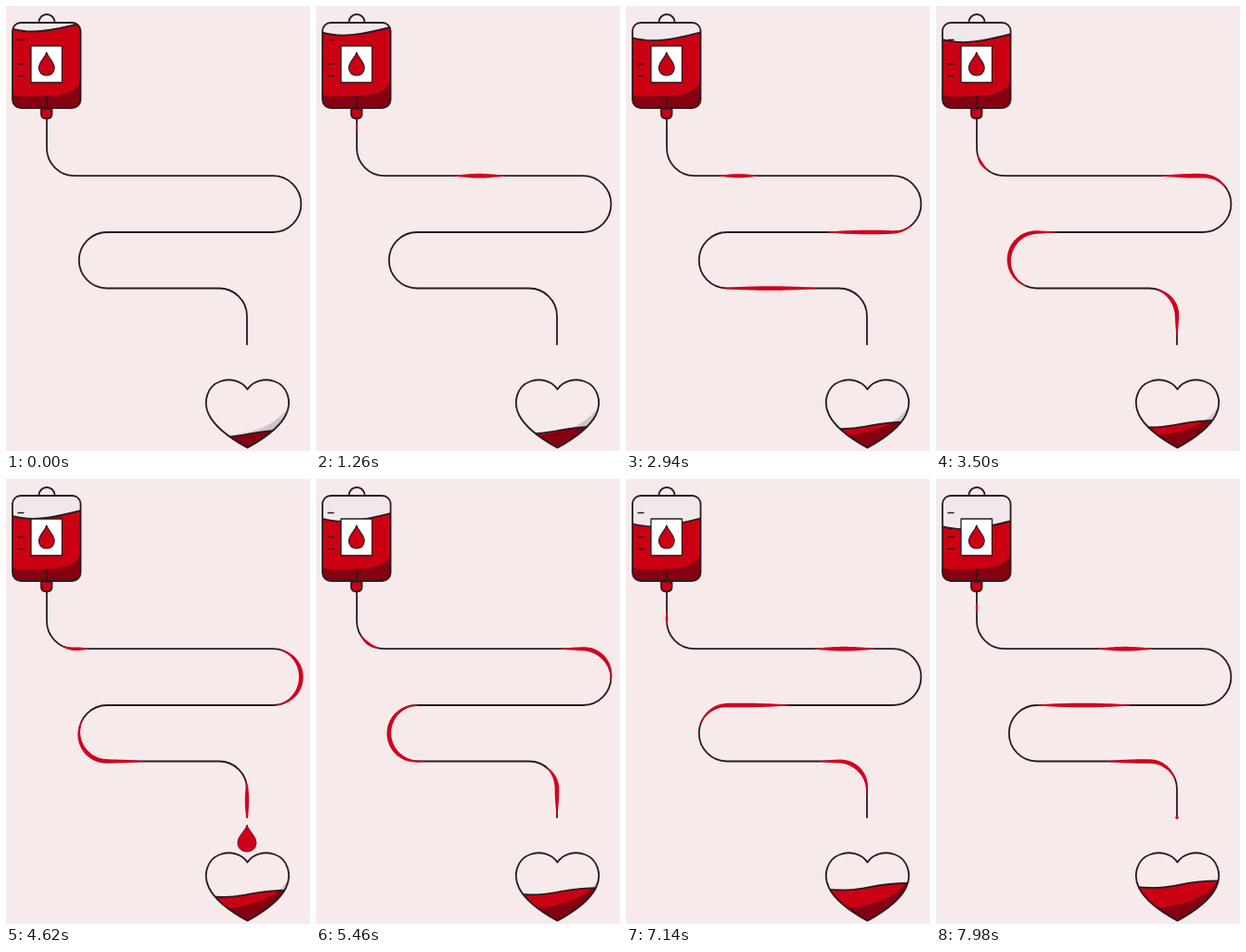
Animation, 328 px wide and 480 px high, one loop 8 s. Source, as an HTML page:

```html
<!DOCTYPE html>
<html lang="en">
<head>
<meta charset="utf-8">
<title>Blood donation</title>
<style>
  html, body { margin: 0; width: 100%; height: 100%; overflow: hidden; background: #f6eaeb; }
  svg { display: block; width: 328px; height: 480px; }
  .line { fill: none; stroke: #2b1a1f; stroke-width: 1.8; stroke-linecap: round; stroke-linejoin: round; }
  .thin { stroke-width: 1.3; }
  .red { fill: #cb0113; }
  .dark { fill: #850011; }
</style>
</head>
<body>
<svg viewBox="0 0 328 480">
  <defs>
    <rect id="bagShape" x="7" y="18" width="73.5" height="92" rx="9"/>
    <path id="heartShape" d="M260.5 413.5C254 404 241 401 231 405C217 410 212 427 219 441C226 455 245 468 260.5 476.5C276 468 295 455 302 441C309 427 304 410 290 405C280 401 267 404 260.5 413.5Z"/>
    <path id="dropShape" d="M0 0C2 7 10 12 10 19.5C10 25.5 5.5 29 0 29S-10 25.5 -10 19.5C-10 12 -2 7 0 0Z"/>
    <path id="heartShade" d="M308 426C298 444 284 458 238 463L250 480H310Z"/>
    <clipPath id="bagClip"><use href="#bagShape"/></clipPath>
    <clipPath id="heartClip"><use href="#heartShape"/></clipPath>
    <clipPath id="heartFill"><path id="heartArea"/></clipPath>
    <linearGradient id="grey" gradientUnits="userSpaceOnUse" x1="272" y1="446" x2="288" y2="466">
      <stop offset="0" stop-color="#e6dcde"/><stop offset="1" stop-color="#bdb5b7"/>
    </linearGradient>
  </defs>

  <path id="tube" class="line" d="M44 121V153A30 30 0 0 0 74 183.2H288A30.4 30.4 0 0 1 288 244H109A30.2 30.2 0 0 0 109 304.5H230A30 30 0 0 1 260 334.5V365"/>
  <path id="blobs" fill="#d0021f"/>

  <circle class="line" cx="44" cy="17.5" r="8.5"/>
  <use href="#bagShape" fill="#f1e8e9"/>
  <g clip-path="url(#bagClip)">
    <g id="bagLiquid">
      <path class="red" d="M7 0C28 6 50 2 81 -6V110H7Z"/>
      <path class="line" d="M7 0C28 6 50 2 81 -6"/>
    </g>
    <path class="dark" d="M82 77C78 92 64 97 42 97C26 97 16 99 6 95V112H82Z"/>
  </g>
  <path class="line thin" d="M13 36.5H19M13 62.5H19M13 75.5H19M44 97V109"/>
  <rect class="line thin" x="27" y="43" width="33.5" height="39.5" style="fill:#fff"/>
  <use href="#dropShape" class="line thin red" transform="translate(43.8 50) scale(.84 .86)" style="fill:#cb0113"/>
  <use href="#bagShape" class="line"/>
  <path class="line" d="M38 110.5H49.5V117Q49.5 121.5 43.8 121.5T38 117Z" style="fill:#cb0113"/>

  <g clip-path="url(#heartClip)"><use href="#heartShade" fill="url(#grey)"/></g>
  <use id="drop" href="#dropShape" fill="#cb0119" stroke="#7a0a1a" stroke-width=".9"/>
  <g clip-path="url(#heartClip)">
    <g clip-path="url(#heartFill)">
      <rect class="red" x="210" y="400" width="100" height="80"/>
      <use href="#heartShade" class="dark"/>
    </g>
    <path id="heartWave" class="line"/>
  </g>
  <use href="#heartShape" class="line"/>
</svg>
<script>
const LOOP = 8000, STEP = 140;
const TRAVEL = 4000, GAP = 946, FIRST = 45;
const DROP_FIRST = 4116, DROP_GAP = 2 * GAP;
const $ = id => document.getElementById(id);
const tube = $('tube'), total = tube.getTotalLength();

// A lens that follows the tube, swelling and shrinking on the way.
function blob(x) {
  const mid = total * (1 - Math.cos(Math.PI * x)) / 2;
  const len = 104 * Math.sin(Math.PI * x ** 1.5);
  if (len < 4) return '';
  const half = 1 + 1.35 * Math.min(1, len / 50);
  const left = [], right = [], n = 24;
  for (let i = 0; i <= n; i++) {
    const s = Math.max(0, Math.min(total, mid + len * (i / n - .5)));
    const p = tube.getPointAtLength(s);
    const a = tube.getPointAtLength(Math.max(0, s - .5));
    const b = tube.getPointAtLength(Math.min(total, s + .5));
    const d = Math.hypot(b.x - a.x, b.y - a.y) || 1;
    const w = .5 + (half - .5) * Math.sin(Math.PI * i / n);
    const nx = (a.y - b.y) / d * w, ny = (b.x - a.x) / d * w;
    left.push(`${(p.x + nx).toFixed(2)} ${(p.y + ny).toFixed(2)}`);
    right.unshift(`${(p.x - nx).toFixed(2)} ${(p.y - ny).toFixed(2)}`);
  }
  return `M${left.concat(right).join('L')}Z`;
}

function drawDrop(t) {
  const age = t < DROP_FIRST ? -1 : (t - DROP_FIRST) % DROP_GAP;
  const visible = age >= 0 && age < 880;
  $('drop').style.display = visible ? '' : 'none';
  if (!visible) return;
  const y = 362 + 2.25e-4 * Math.max(0, age - 283) ** 2;
  const size = Math.min(1, Math.max(.03, age / 480));
  $('drop').setAttribute('transform', `translate(260 ${y}) scale(${size})`);
}

function draw(t) {
  let d = '';
  for (let start = FIRST; start < t; start += GAP) {
    const x = (t - start) / TRAVEL;
    if (x < 1) d += blob(x);
  }
  $('blobs').setAttribute('d', d);
  drawDrop(t);

  $('bagLiquid').setAttribute('transform', `translate(0 ${24.5 + t * .00335})`);
  const y = 461 - t * .003;
  const wave = `M212 ${y + 2.5}C258 ${y + 8} 262 ${y - 5} 310 ${y - 3.5}`;
  $('heartWave').setAttribute('d', wave);
  $('heartArea').setAttribute('d', wave + 'V480H212Z');
}

const origin = performance.now();
function tick() {
  const t = (performance.now() - origin) % LOOP;
  draw(t - t % STEP);
  requestAnimationFrame(tick);
}
tick();
</script>
</body>
</html>
```
